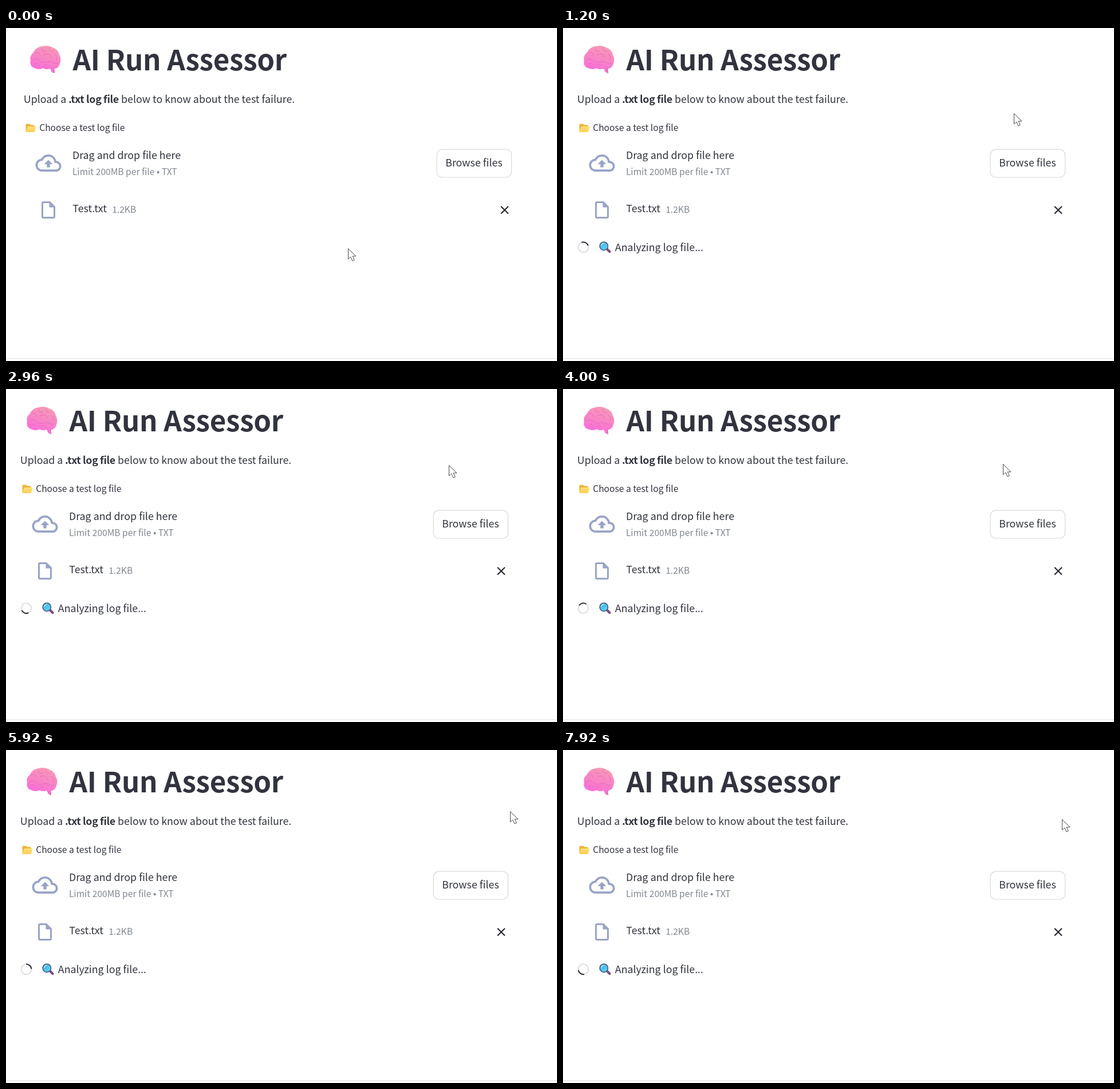
These frames come from a looping animation (962 px wide and 582 px high, 8000 ms). An HTML page:

```html
<!DOCTYPE html>
<html lang="en">
<head>
<meta charset="utf-8">
<title>AI Run Assessor</title>
<style>
  html, body { margin: 0; width: 100%; height: 100%; overflow: hidden; background: #fff; }
  svg { display: block; width: 962px; height: 582px; }
  text { font: 17.82px "Noto Sans CJK JP", "Noto Sans CJK SC", "Noto Sans", sans-serif; fill: #31333f; white-space: pre; }
  .title { font-size: 49.2px; font-weight: 700; letter-spacing: -.005em; }
  .bold { font-weight: 700; letter-spacing: -.35px; }
  .small { font-size: 15.6px; }
  .muted { fill: #808792; }
  .icon { fill: #98a3c7; }
</style>
</head>
<body>
<svg viewBox="0 0 962 582">
  <defs>
    <linearGradient id="pink" x1=".7" y1="0" x2=".35" y2="1">
      <stop offset="0" stop-color="#f79bb5"/>
      <stop offset=".5" stop-color="#f884c6"/>
      <stop offset="1" stop-color="#fb68dd"/>
    </linearGradient>
    <linearGradient id="yellow" x2="0" y2="1">
      <stop offset="0" stop-color="#ffe07a"/>
      <stop offset="1" stop-color="#fdce50"/>
    </linearGradient>
    <linearGradient id="glass" x2="1" y2="1">
      <stop offset="0" stop-color="#3fb4e6"/>
      <stop offset="1" stop-color="#62d3f2"/>
    </linearGradient>
  </defs>

  <path d="M0 577.8H962" stroke="#e4e5e8" stroke-width="1.3"/>

  <g id="page">
    <!-- brain -->
    <g transform="translate(36 31)" fill="none" stroke-linecap="round">
      <path fill="#d84aa9" d="M31 36 37 40 38 46 43 48 42 38Z"/>
      <path fill="url(#pink)" d="M21 1C27-1 35 0 39 3 46 5 50 10 51 16 54 20 54 27 52 31 51 37 46 41 41 40L42 47.5 38 46 35 40C29 42 25 41 23 39 18 42 11 41 8 39 2 38-1 31 1 26-1 20 2 15 6 12 8 6 14 2 21 1Z"/>
      <path stroke="#e56cb9" stroke-width="1" d="M8 13C13 10 17 12 17 17M21 4C19 9 24 11 28 9M34 4C33 9 38 11 42 9M24 16C30 12 36 15 36 20M43 15C47 17 48 21 46 25M3 26C9 21 15 23 18 27 24 32 31 26 36 28 41 29 44 33 49 30M23 36C24 33 27 32 30 33M9 32C12 30 15 31 16 34"/>
    </g>
    <text class="title" x="110.5" y="73.5">AI Run Assessor</text>

    <text x="24.8" y="130.5">Upload a </text>
    <text class="bold" x="103" y="130.5">.txt log file</text>
    <text x="195" y="130.5">below to know about the test failure.</text>

    <!-- folder -->
    <path fill="#efb33a" d="M28.5 169.5Q28.5 167.5 30.5 167.5H35L37 169.5H42Q43.8 169.5 43.8 171.5V181H28.5Z"/>
    <path fill="url(#yellow)" d="M33 172H45Q46.8 172 46.3 173.7L44.2 180.5Q43.8 182 42.3 182H30Q28.2 182 28.7 180.2L31.2 173.4Q31.6 172 33 172Z"/>
    <text class="small" x="52.2" y="179.8">Choose a test log file</text>

    <path class="icon" fill-rule="evenodd" transform="translate(45.5 213.5) scale(1.875)" d="M19.35 10.04C18.67 6.59 15.64 4 12 4 9.11 4 6.6 5.64 5.35 8.04 2.34 8.36 0 10.91 0 14c0 3.31 2.69 6 6 6h13c2.76 0 5-2.24 5-5 0-2.64-2.05-4.78-4.65-4.96zM19 18H6c-2.21 0-4-1.79-4-4 0-2.05 1.53-3.76 3.56-3.97l1.07-.11.5-.95C8.08 7.14 9.94 6 12 6c2.62 0 4.88 1.86 5.39 4.43l.3 1.5 1.53.11c1.56.1 2.78 1.41 2.78 2.96 0 1.65-1.35 3-3 3zM8 13h2.55v3h2.9v-3H16l-4-4z"/>
    <text x="109.9" y="229">Drag and drop file here</text>
    <text class="small muted" x="109.9" y="257.2">Limit 200MB per file • TXT</text>
    <rect x="746.2" y="212.2" width="130.4" height="48.8" rx="9.5" fill="#fff" stroke="#dadade" stroke-width="1.2"/>
    <text x="761.2" y="242.3">Browse files</text>

    <path class="icon" fill-rule="evenodd" transform="translate(50 300) scale(1.5)" d="M14 2H6C4.9 2 4 2.9 4 4V20C4 21.1 4.9 22 6 22H18C19.1 22 20 21.1 20 20V8ZM6 20V4H13V9H18V20Z"/>
    <text x="110.3" y="322.2">Test.txt</text>
    <text class="small muted" x="179.2" y="322.5">1.2KB</text>
    <path d="M858.2 311.7 871 324.5M871 311.7 858.2 324.5" stroke="#262730" stroke-width="2.1"/>

    <g id="status">
      <g fill="none" stroke-width="2.1">
        <circle cx="35.5" cy="383.2" r="8.9" stroke="#dddee1"/>
        <path id="arc" stroke="#31333f" d="M29.2 376.9A8.9 8.9 0 0 1 41.8 376.9"/>
      </g>
      <!-- magnifier -->
      <path d="M77 386.5 81.5 391" stroke="#7d4a86" stroke-width="4.2" stroke-linecap="round"/>
      <circle cx="71.3" cy="381.2" r="7.2" fill="url(#glass)" stroke="#3f5673" stroke-width="1.5"/>
      <path d="M66.8 380Q67.6 376.8 71 376.3" fill="none" stroke="#a9e6fa" stroke-width="1.4" stroke-linecap="round"/>
      <text x="90.8" y="390">Analyzing log file...</text>
    </g>
  </g>

  <path id="cursor" fill="#fff" stroke="#34353b" stroke-width=".9" stroke-linejoin="round" d="M.5.5V18.8L4.7 15 8 22 11.3 20.6 8.2 13.9H14Z"/>
</svg>
<script>
  const LOOP = 8000, STEP = 80, START = 160;
  const byId = id => document.getElementById(id);
  const page = byId('page'), status = byId('status'), arc = byId('arc'), cursor = byId('cursor');

  // [time, x, y] of the pointer tip
  const pointer = [
    [0, 597, 385], [160, 606, 393], [400, 658, 387], [640, 658, 387], [1280, 793, 138],
    [2400, 793, 138], [3200, 768, 131], [4400, 768, 131], [4880, 779, 125], [5200, 779, 125],
    [5680, 880, 107], [6880, 880, 107], [7440, 871, 121], [LOOP, 871, 121]
  ];
  // [time, turns] of the spinner
  const spin = [
    [0, -.72], [560, .125], [2000, 2.25], [4000, 4.972],
    [5200, 6.875], [6720, 9.5], [7920, 11.6], [LOOP, 11.74]
  ];

  const linear = p => p;
  const smooth = p => p * p * (3 - 2 * p);

  function sample(table, t, ease) {
    const i = Math.max(1, table.findIndex(row => row[0] >= t));
    const [from, to] = [table[i - 1], table[i]];
    const p = ease((t - from[0]) / (to[0] - from[0]));
    return from.slice(1).map((v, k) => v + (to[k + 1] - v) * p);
  }

  function draw(now) {
    const t = Math.floor((now % LOOP) / STEP) * STEP;
    const [x, y] = sample(pointer, t, smooth);
    const [turns] = sample(spin, t, linear);
    const busy = t >= START;
    page.setAttribute('transform', `translate(${busy ? 0 : 6} 0)`);
    status.setAttribute('visibility', busy ? 'visible' : 'hidden');
    arc.setAttribute('transform', `rotate(${turns * 360} 35.5 383.2)`);
    cursor.setAttribute('transform', `translate(${Math.round(x)} ${Math.round(y)})`);
  }

  let begin;
  function tick(now) {
    begin ??= now;
    draw(Math.max(0, now - begin));
    requestAnimationFrame(tick);
  }
  draw(0);
  requestAnimationFrame(tick);
</script>
</body>
</html>
```
